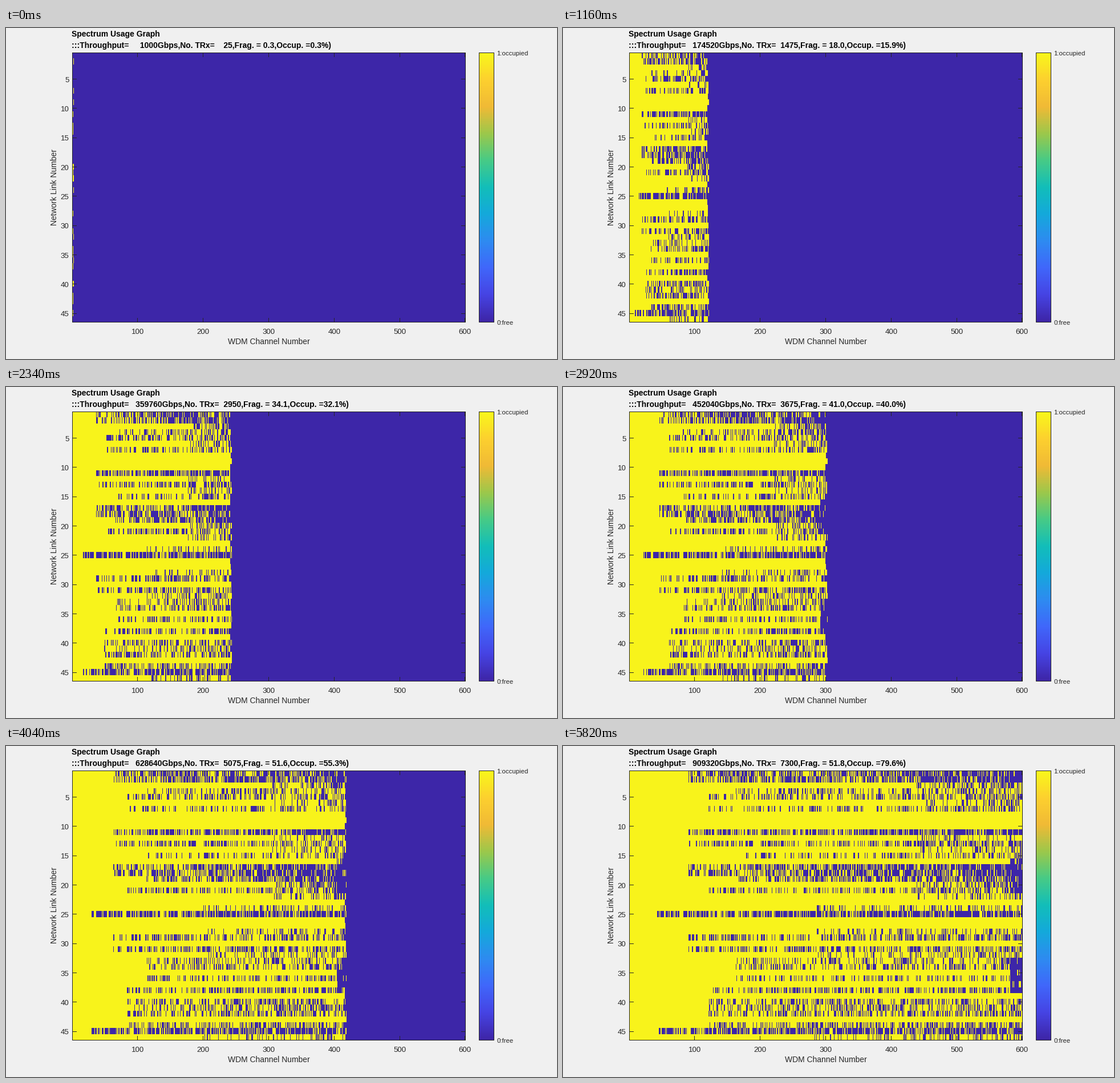
A matplotlib script for the animation above (5840 ms loop, 966x580 px).

```python
import numpy as np
import matplotlib.pyplot as plt
from matplotlib.animation import FuncAnimation
from matplotlib.colors import LinearSegmentedColormap

W, H, DPI = 966, 580, 100
FRAMES, STEP_MS = 292, 20
LINKS, CHANNELS = 46, 600
LEFT, RIGHT, TOP, BOTTOM = 116.5, 805.5, 43.5, 515.5
BAR_LEFT, BAR_RIGHT = 829.5, 855.5
TICK = 7
INK = "#262626"
PALETTE = np.array([(61, 38, 168), (248, 243, 27)], np.uint8)
PARULA = ("#3e26a8 #4644e4 #4067fb #2e8bf1 #14a9db #12beb9 "
          "#47cb86 #9cc84b #f0ba36 #fdd02f #f9f71b").split()

# Key points of the counters: demand batch, throughput in Gbps, fragmentation
BATCH = [1, 59, 118, 147, 203, 240, 292]
RATE = [1000, 174520, 359760, 452040, 628640, 744760, 909320]
FRAG = [0.3, 18.0, 34.1, 41.0, 51.6, 55.4, 51.8]

# Relative distance to the front at which a link starts to show gaps
ONSET = {
    .07: (25, 45),
    .15: (1, 2, 11, 13, 17, 18, 29, 31),
    .20: (5, 7, 21, 38, 40, 41, 42, 44),
    .27: (4, 15, 19, 33, 34, 36),
    .47: (24, 28, 32, 46),
    .73: (3, 6, 12, 14, 20, 22),
}
SPARSE = [1, 2, 3, 11, 17, 18, 19, 20]
LAGGING = [1, 2, *range(16, 22), *range(33, 39)]

rng = np.random.default_rng(12)
noise = rng.random((LINKS, CHANNELS))
offset = rng.integers(-2, 2, (LINKS, 1))
channel = np.arange(1, CHANNELS + 1)

onset = np.full((LINKS + 1, 1), np.inf)
for value, links in ONSET.items():
    onset[list(links)] = value
onset = onset[1:]


def mask(links):
    return np.isin(np.arange(1, LINKS + 1), links)[:, None]


sparse, lagging = mask(SPARSE), mask(LAGGING)


def occupied_percent(n):
    return .27335 * n - .2 * (1 - np.exp(-n / 15))


def occupancy(i):
    """Channels fill up to a moving front; gaps left behind it close over time."""
    front = 7.55 * occupied_percent(i + 1)
    place = channel / front
    ramp = np.clip((place - onset) / (1 - np.minimum(onset, .9)), 0, 1)
    gap = .12 + .035 / onset + .15 * ramp + sparse * (.08 + .2 * ramp)
    gap = np.where(place >= onset, gap, 0)
    if front > 250:
        gap = np.where(lagging & (place > .967), .9, gap)
    gap = np.maximum(gap, .35 * np.exp(-i / 4))
    return (channel <= front + offset) & (noise >= gap)


def caption(i):
    n = i + 1
    rate = 40 * round(np.interp(n, BATCH, RATE) / 40)
    return (f":::Throughput={rate:9d}Gbps,No. TRx={25 * n:6d},"
            f"Frag. = {np.interp(n, BATCH, FRAG):.1f},"
            f"Occup. ={occupied_percent(n):.1f}%)")


plt.rcParams["font.family"] = "Liberation Sans"
fig = plt.figure(figsize=(W / DPI, H / DPI), dpi=DPI, facecolor="#f0f0f0")
ax = fig.add_axes([0, 0, 1, 1])


def label(x, y, s, px, color=INK, **kw):
    return ax.text(x, y, s, fontsize=px * 72 / DPI, color=color, va="baseline", **kw)


def line(xs, ys):
    """One pixel wide line through pixel centres."""
    ax.plot(np.floor(xs) + .5, np.floor(ys) + .5, color=INK, lw=72 / DPI,
            solid_capstyle="projecting", snap=False, zorder=3)


def frame_box(x0, x1):
    line([x0, x1, x1, x0, x0], [TOP, TOP, BOTTOM, BOTTOM, TOP])


def cells(i):
    return PALETTE[occupancy(i).astype(int)]


grid = ax.imshow(cells(0), extent=(LEFT, RIGHT, BOTTOM, TOP),
                 interpolation="nearest", aspect="auto")
frame_box(LEFT, RIGHT)

for c in range(100, CHANNELS + 1, 100):
    x = LEFT + (c - .5) / CHANNELS * (RIGHT - LEFT)
    line([x, x], [BOTTOM, BOTTOM - TICK])
    line([x, x], [TOP, TOP + TICK])
    label(x, 535.5, str(c), 13.3, ha="center")
for link in range(5, LINKS, 5):
    y = TOP + (link - .5) / LINKS * (BOTTOM - TOP)
    line([LEFT, LEFT + TICK], [y, y])
    line([RIGHT, RIGHT - TICK], [y, y])
    label(110.5, y + 5.2, str(link), 13.3, ha="right")
label(461, 554, "WDM Channel Number", 13.9, ha="center")
label(89, 279.5, "Network Link Number", 13.9, ha="center",
      rotation=90, rotation_mode="anchor")

ax.imshow(np.linspace(1, 0, 256)[:, None], aspect="auto",
          cmap=LinearSegmentedColormap.from_list("parula", PARULA),
          extent=(BAR_LEFT, BAR_RIGHT, BOTTOM, TOP))
frame_box(BAR_LEFT, BAR_RIGHT)
label(860.5, 48, "1:occupied", 11.4)
label(860.5, 520.5, "0:free", 11.4)

label(115, 15.5, "Spectrum Usage Graph", 13.9, "black", weight="bold")
status = label(115, 35, caption(0), 13.9, "black", weight="bold")

ax.set(xlim=(0, W), ylim=(H, 0))
ax.axis("off")


def update(i):
    grid.set_data(cells(i))
    status.set_text(caption(i))
    return grid, status


anim = FuncAnimation(fig, update, frames=FRAMES, interval=STEP_MS,
                     repeat=True, repeat_delay=0)
plt.show()
```
